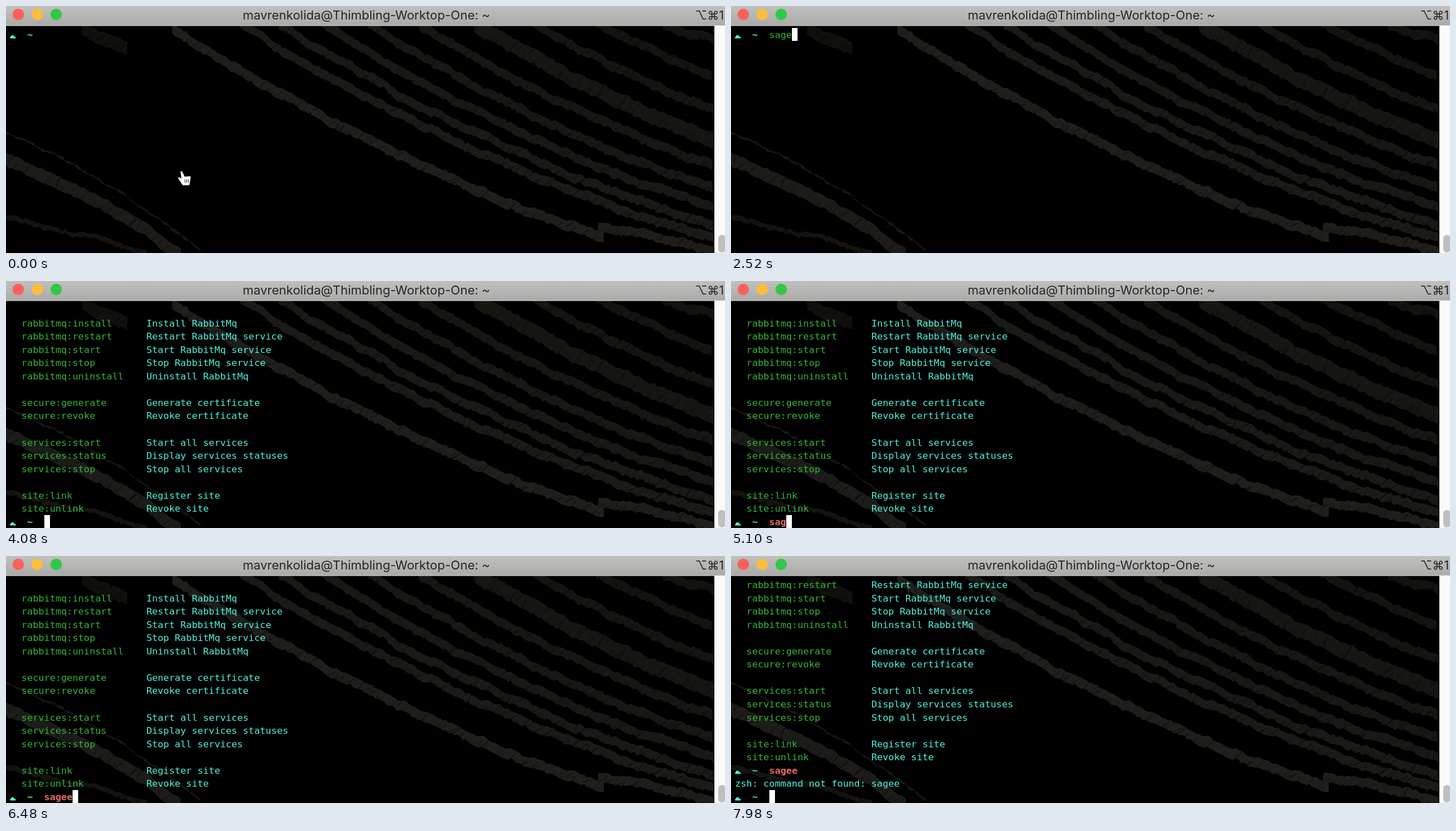
An HTML page with a canvas that plays this animation: 1275 px wide and 439 px high, repeating every 8000 ms.

```html
<!DOCTYPE html>
<html lang="en">
<head>
<meta charset="utf-8">
<title>Terminal</title>
<style>
html, body { margin: 0; width: 100%; height: 100%; overflow: hidden; background: #000; }
canvas { display: block; width: 1275px; height: 439px; }
</style>
</head>
<body>
<canvas id="stage" width="1275" height="439"></canvas>
<script>
const W = 1275, H = 439, LOOP = 8000, BLINK = 540;
const X0 = 7.2, COL = 10.07, ROW = 23.56, TOP = 39, BAR = 35, EDGE = 1256;
const MONO = '16.73px "DejaVu Sans Mono", monospace';
const UI = 'Inter, "DejaVu Sans", sans-serif';
const GREEN = '#35b535', CYAN = '#4ff3dc', MINT = '#4fe9a0', RED = '#e66b69';
const ctx = document.getElementById('stage').getContext('2d');

const HELP = `rabbitmq:install|Install RabbitMq
rabbitmq:restart|Restart RabbitMq service
rabbitmq:start|Start RabbitMq service
rabbitmq:stop|Stop RabbitMq service
rabbitmq:uninstall|Uninstall RabbitMq

secure:generate|Generate certificate
secure:revoke|Revoke certificate

services:start|Start all services
services:status|Display services statuses
services:stop|Stop all services

site:link|Register site
site:unlink|Revoke site`.split('\n').map(line => line.split('|'));

// key press times for each command
const FIRST = [540, 660, 780, 960];
const SECOND = [4620, 4740, 4920, 5160, 5340];
const RUN = 2580, LISTED = 2760, FAIL = 7500;
const RESETS = [300, ...FIRST, RUN, LISTED, ...SECOND, FAIL];

function seeded(seed) {
  return () => (seed = (seed * 16807) % 2147483647) / 2147483647;
}

// one bowed strip of rock from (x1, y1) to (x2, y2)
function addLayer(g, rnd, thick, tone, x1, y1, x2, y2, bow) {
  const upper = [], lower = [];
  let drift = 0;
  for (let x = x1; x <= x2; x += 5) {
    const u = (x - x1) / (x2 - x1);
    drift = drift * 0.8 + (rnd() - 0.5) * 4;
    const y = y1 + (y2 - y1) * u + 4 * bow * u * (1 - u) + drift;
    upper.push([x, y - thick / 2 + rnd() * 3]);
    lower.unshift([x, y + thick / 2 - rnd() * 4]);
  }
  g.save();
  g.beginPath();
  for (const p of upper.concat(lower)) g.lineTo(...p);
  g.closePath();
  g.fillStyle = `rgb(${tone},${tone},${tone - 3})`;
  g.fill();
  g.clip();
  for (const [x, y] of upper) {
    const top = y + rnd() * thick * 0.7;
    g.strokeStyle = `rgba(0,0,0,${rnd() * 0.5})`;
    g.lineWidth = 0.6 + rnd() * 1.6;
    g.beginPath();
    g.moveTo(x + 5, top);
    g.lineTo(x - 2 - rnd() * 10, top + thick * (0.2 + rnd() * 0.6));
    g.stroke();
  }
  g.restore();
}

function makeRock() {
  const rock = document.createElement('canvas');
  rock.width = W;
  rock.height = H;
  const g = rock.getContext('2d');
  const rnd = seeded(4127);
  const add = (...shape) => addLayer(g, rnd, ...shape);
  g.fillRect(0, 0, W, H);
  for (let i = 0; i < 9; i++) {
    add(i === 5 ? 32 : 20, 27 - i, 415 + 65 * i + 3.6 * i * i, 32,
      EDGE, 412 - 20 * i - 3 * i * i, Math.max(0, 38 - 5 * i));
  }
  add(22, 31, 295, 42, 1060, 412, 28);
  add(20, 30, 1050, 396, EDGE, 437, -5);
  add(27, 28, 0, 274, 310, 442, -13);
  add(7, 24, 0, 229, 345, 437, -20);
  add(12, 20, 0, 376, 250, 440, -4);
  add(28, 16, 135, 42, 215, 76, 0);
  return rock;
}

function drawText(str, col, row, color, bold) {
  ctx.font = (bold ? 'bold ' : '') + MONO;
  ctx.fillStyle = color;
  ctx.textAlign = 'left';
  ctx.fillText(str, X0 + col * COL, TOP + 18 + row * ROW);
}

function drawPrompt(row, cmd) {
  const y = TOP + 15.5 + row * ROW;
  ctx.fillStyle = CYAN;
  ctx.beginPath();
  ctx.arc(11.5, y, 2.8, 0, 7);
  ctx.roundRect(7, y, 10.5, 3, 1.5);
  ctx.fill();
  drawText('~', 3, row, MINT, true);
  const known = cmd === 'sage';
  drawText(cmd, 6, row, known ? GREEN : RED, !known);
}

function drawHelp(first) {
  HELP.forEach(([name, about], i) => {
    if (!about || first + i < 0) return;
    drawText(name, 2, first + i, GREEN);
    drawText(about, 24, first + i, CYAN);
  });
}

function drawCursor(col, row) {
  ctx.fillStyle = '#fff';
  ctx.fillRect(Math.round(X0 + col * COL), Math.round(TOP + row * ROW), 10, 23);
}

function drawHand() {
  const hand = new Path2D('M311 295L316 305L326 304L324 317H314L307 306L313 309Z');
  ctx.fillStyle = ctx.strokeStyle = '#fff';
  ctx.lineWidth = 3;
  ctx.lineJoin = 'round';
  ctx.fill(hand);
  ctx.stroke(hand);
  ctx.fillStyle = '#222';
  for (let i = 0; i < 3; i++) ctx.fillRect(317 + i * 3, 308, 1, 6);
}

function drawLabel(str, size, align, x) {
  ctx.fillStyle = '#262626';
  ctx.font = `${size}px ${UI}`;
  ctx.textAlign = align;
  ctx.fillText(str, x, 24);
}

function drawChrome() {
  const bar = ctx.createLinearGradient(0, 0, 0, BAR);
  bar.addColorStop(0, '#c0c0be');
  bar.addColorStop(1, '#aaaaa8');
  ctx.fillStyle = bar;
  ctx.fillRect(0, 0, W, BAR);
  ctx.fillStyle = '#c9c9c7';
  ctx.fillRect(0, BAR - 1, W, 1.5);
  ['#fc605b', '#fdbd3f', '#33c748'].forEach((color, i) => {
    ctx.fillStyle = color;
    ctx.beginPath();
    ctx.arc(21.8 + i * 33.6, 15, 10.2, 0, 7);
    ctx.fill();
  });
  drawLabel('mavrenkolida@Thimbling-Worktop-One: ~', 22, 'center', 639);
  drawLabel('⌥⌘1', 21, 'right', 1273);
  ctx.fillStyle = '#fafafa';
  ctx.fillRect(EDGE, BAR, W - EDGE, H);
  ctx.fillStyle = '#dedede';
  ctx.fillRect(EDGE, BAR, 1, H);
  ctx.fillStyle = '#bfbfbf';
  ctx.beginPath();
  ctx.roundRect(1263, 407, 13, 31, 6);
  ctx.fill();
}

const typed = (word, keys, t) => word.slice(0, keys.filter(k => t >= k).length);

function cursorOn(t) {
  const last = RESETS.filter(k => t >= k).pop();
  return last !== undefined && Math.floor((t - last) / BLINK) % 2 === 0;
}

const rock = makeRock();

function draw(t) {
  ctx.drawImage(rock, 0, 0);
  let col = 6, row = 16;
  if (t < LISTED) {
    const cmd = typed('sage', FIRST, t);
    drawPrompt(0, cmd);
    row = t < RUN ? 0 : 1;
    col = t < RUN ? 6 + cmd.length : 0;
  } else if (t < FAIL) {
    const cmd = typed('sagee', SECOND, t);
    drawHelp(1);
    drawPrompt(16, cmd);
    col += cmd.length;
  } else {
    drawHelp(-1);
    drawPrompt(14, 'sagee');
    drawText('zsh: command not found: sagee', 0, 15, CYAN);
    drawPrompt(16, '');
  }
  if (cursorOn(t)) drawCursor(col, row);
  if (t < FIRST[0]) drawHand();
  drawChrome();
}

const start = performance.now();
function tick() {
  draw((performance.now() - start) % LOOP);
  requestAnimationFrame(tick);
}
tick();
</script>
</body>
</html>
```
